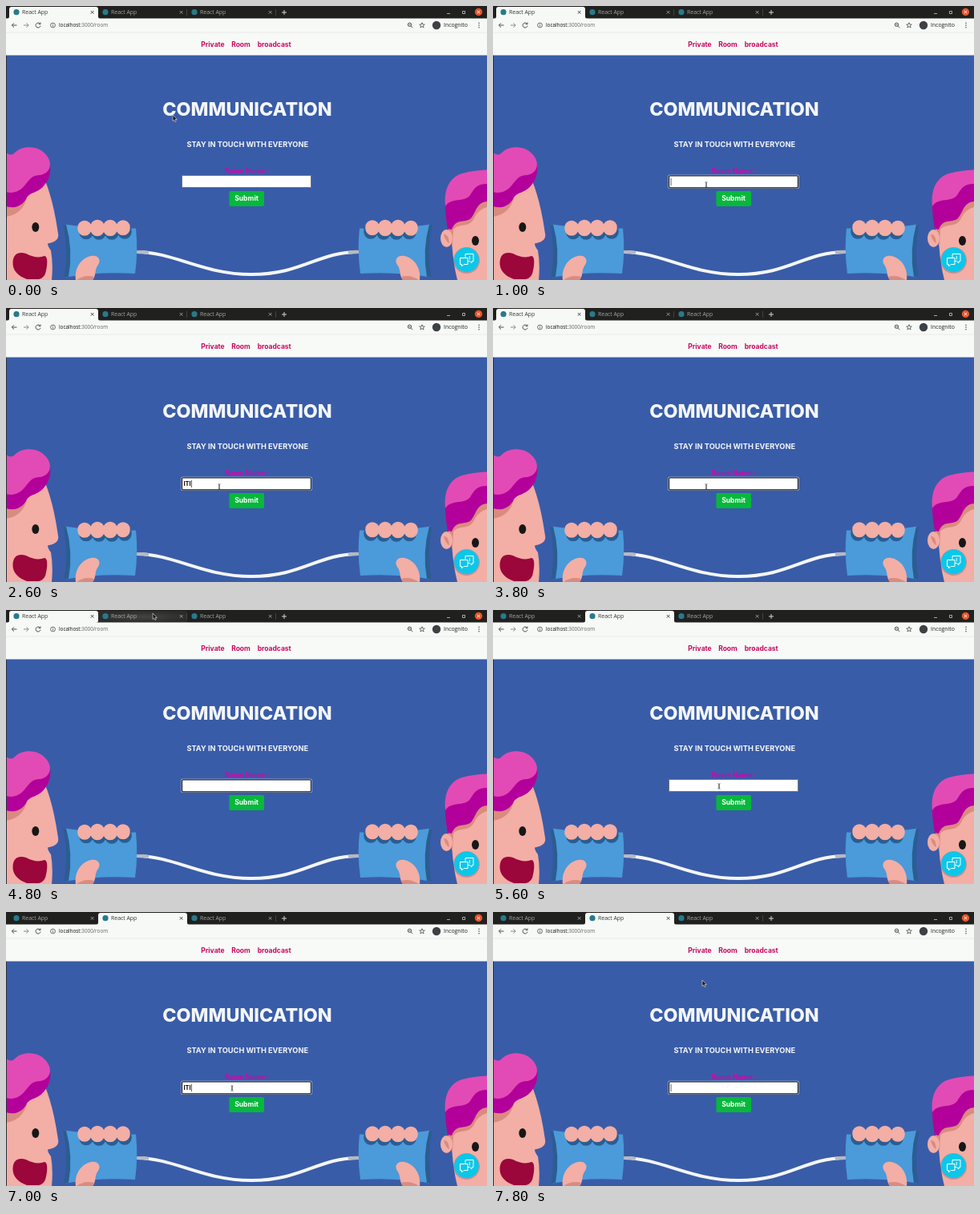
Write an HTML page that moves like this. It is 600 by 342 pixels and loops after 8 s.

```html
<!DOCTYPE html>
<html lang="en">
<head>
<meta charset="utf-8">
<title>Room chat</title>
<style>
  html, body { margin: 0; width: 100%; height: 100%; overflow: hidden; }
  svg { display: block; width: 100%; height: 100%; }
  text { font-family: Inter, sans-serif; font-weight: 700; }
  .ui { font-family: "Open Sans", sans-serif; font-weight: 400; font-size: 6.9px; }
  .mid { text-anchor: middle; }
  .line { fill: none; stroke: #4a4d50; stroke-width: 1; }
  .skin { fill: #f3aea5; }
  .shade { fill: #da8b80; }
  .pink { fill: #e24bb5; }
  .magenta { fill: #b3009a; }
</style>
</head>
<body>
<svg viewBox="0 0 600 342" preserveAspectRatio="none">
  <defs>
    <radialGradient id="glow"><stop stop-color="#444542"/><stop offset="1" stop-color="#2b2c2a"/></radialGradient>
    <path id="fingers" fill="none" stroke-width="17.500" stroke-linecap="round" d="M98 276.500V278M114 275.500V278.500M130 275.500V278.500M146 276V277.500"/>
    <g id="can">
      <path fill="#4b9ad9" d="M73 272.500Q118 279 162 277.500Q165 306 161 334Q118 331 75 338.500Q84 305 73 272.500Z"/>
      <path fill="#2b5d92" d="M71.500 273L75 272.500Q84 305 78 338L72.500 338.500Q78 305 71.500 273Z"/>
      <use href="#fingers" x="2" y="4.500" stroke="#2b5d92"/>
      <use href="#fingers" stroke="#f3aea5"/>
      <path class="skin" d="M87 342C85 326 95 314 106 312C115 310 119 317 115 323C110 329 113 336 108 342Z"/>
      <path class="shade" d="M88 342Q98 335 110 338L108 342Z"/>
    </g>
  </defs>

  <rect width="600" height="342" fill="#395ca8"/>

  <g id="left-face">
    <path class="skin" d="M0 232L48 216Q59 242 65 284Q67 294 52 296.500Q52 300 56 305Q59 322 57 342H0Z"/>
    <path class="shade" d="M0 246Q15 246 20 236L27 236Q22 260 0 263Z"/>
    <path class="magenta" d="M0 208L55 197Q57 212 49 222C40 235 29 231 25 241C19 251 9 253 0 250Z"/>
    <path class="pink" d="M0 183Q7 188 11 183C22 172 43 175 51 187C59 198 54 209 43 211C32 211 30 216 24 223C18 231 9 235 0 232Z"/>
    <ellipse cx="36.800" cy="276" rx="4.500" ry="6" fill="#171717"/>
    <path fill="#9b063b" d="M8.500 320C9 309 16 306 25 309Q38 316 48 312C52 312 52 322 50 330Q49 339 41 341H26C15 337 8 330 8.500 320Z"/>
  </g>

  <g id="right-face">
    <path class="skin" d="M554 262L600 240V342H563Q558 322 556.500 300L553 285Z"/>
    <path class="shade" d="M552 262L600 240V251Q589 254 584 265C577 278 566 270 558 279L557 300L552 280Z"/>
    <ellipse class="skin" cx="549.500" cy="290" rx="7.500" ry="11"/>
    <path class="shade" d="M546 285Q552 284 553 296Q548 294 546 285Z"/>
    <path class="magenta" d="M548 239L600 216V244C587 245 586 258 580 265C571 272 562 264 556 279L551 278Q547 258 548 239Z"/>
    <path class="pink" d="M548 250C546 229 553 214 569 209Q583 205 600 204.500V222C587 222 584 228 579 236C571 246 556 238 548 250Z"/>
    <ellipse cx="585.500" cy="293" rx="4.500" ry="6" fill="#171717"/>
  </g>

  <path fill="none" stroke="#f4f6f6" stroke-width="4" d="M163 307C210 307 245 335 306 335C370 335 388 307 440 307"/>
  <path fill="none" stroke="#b5b9c0" stroke-width="4" d="M162 307Q171 306.500 178 308M441 307Q434 306.500 427 308"/>
  <use href="#can"/>
  <use href="#can" transform="translate(603) scale(-1 1)"/>

  <circle cx="574.500" cy="317.500" r="16.500" fill="#1d3f80" opacity=".25"/>
  <circle cx="574.500" cy="316.800" r="15.300" fill="#0bc7e9"/>
  <g fill="#0bc7e9" stroke="#fff" stroke-width="1" stroke-linejoin="round">
    <path d="M573 309.500H583V318.500H581V321L578.500 318.500H573Z"/>
    <path d="M566.500 314.500H576V322.500H571L568.500 325V322.500H566.500Z"/>
    <path d="M578.300 312V316.500" stroke-width=".9"/>
  </g>

  <rect width="1" height="342" fill="#2d313c"/>
  <rect y="33" width="600" height="28.500" fill="#f8faf8"/>
  <g class="mid" fill="#c9085f" font-size="8.500">
    <text x="258" y="50.500">Private</text>
    <text x="293" y="50.500">Room</text>
    <text x="334.700" y="50.500">broadcast</text>
  </g>
  <g class="mid" fill="#f3f6f8">
    <text x="301" y="137" font-size="23.300" style="font-weight:800">COMMUNICATION</text>
    <text x="301.300" y="176" font-size="9.250">STAY IN TOUCH WITH EVERYONE</text>
  </g>
  <text class="mid" x="300.500" y="208.800" font-size="8.600" fill="#bd0fae">Room Name :</text>

  <g id="focus">
    <rect x="218.500" y="210.800" width="163" height="17" rx="1.500" fill="#e9edf3"/>
    <rect x="219.500" y="211.800" width="161" height="15" rx="1" fill="#fff" stroke="#17191c" stroke-width="1.200"/>
  </g>
  <rect id="plain" x="219.500" y="211.500" width="161" height="15" fill="#fff" stroke="#70757c"/>
  <text id="typed" x="221.500" y="222" font-size="7.500" fill="#111"></text>
  <rect id="caret" y="215" width=".7" height="9" fill="#222"/>
  <rect x="278.500" y="231" width="43.500" height="19" rx="1.800" fill="#06b83b"/>
  <text class="mid" x="300" y="243.300" font-size="8.600" fill="#fff">Submit</text>

  <rect width="600" height="16" fill="#20211f"/>
  <g id="tabs"></g>
  <path class="line" style="stroke:#d4d6d4" d="M344 8H350M347 5V11"/>
  <path class="line" style="stroke:#c9cbc9;stroke-width:.8" d="M550 9.500H554M569.500 6.500H572.500V9.500H569.500Z"/>
  <circle cx="589.500" cy="7.500" r="4.700" fill="#e8552b"/>
  <path class="line" style="stroke:#fff" d="M587.800 5.800L591.200 9.200M591.200 5.800L587.800 9.200"/>

  <rect y="15.500" width="600" height="17.500" fill="#f7f9f7"/>
  <rect y="32.700" width="600" height=".6" fill="#dcdfdc"/>
  <path class="line" d="M13.500 24H7.500M10 21.300L7.300 24L10 26.700M42.300 22A3 3 0 1 0 43 24.800M43 20.500V22.700H40.800"/>
  <path class="line" style="stroke:#85898a" d="M22 24H28M25.500 21.300L28.200 24L25.500 26.700"/>
  <circle class="line" cx="58.500" cy="24" r="2.900" style="stroke-width:.8"/>
  <path class="line" style="stroke-width:.8" d="M58.500 23.500V25.700M58.500 22.200V22.900"/>
  <text class="ui" x="66" y="26.300" style="font-size:6.350px" fill="#111">localhost<tspan fill="#5f6361">:3000/room</tspan></text>
  <circle class="line" cx="503.500" cy="23.300" r="2.200"/>
  <path class="line" d="M505.200 25L507.300 27.100M502.500 23.300H504.500"/>
  <path class="line" style="stroke-width:.8" d="M519 20.700L519.900 23L522.300 23.100L520.400 24.600L521.100 27L519 25.600L516.900 27L517.600 24.600L515.700 23.100L518.100 23Z"/>
  <circle cx="537" cy="24" r="5.200" fill="#3d4144"/>
  <text class="ui" x="546" y="26.300" fill="#1d1f21">Incognito</text>
  <g fill="#4a4d50">
    <circle cx="590" cy="21.300" r=".8"/><circle cx="590" cy="24" r=".8"/><circle cx="590" cy="26.700" r=".8"/>
  </g>

  <path id="arrow" d="M0 0V7.500L1.700 6L2.900 8.700L4.300 8L3.100 5.500H5.300Z" fill="#151515" stroke="#eee" stroke-width=".6"/>
  <path id="beam" d="M-1.500 -3.300Q0 -3.300 0 -2.300V2.300Q0 3.300 -1.500 3.300M1.500 -3.300Q0 -3.300 0 -2.300V2.300Q0 3.300 1.500 3.300" fill="none" stroke="#333" stroke-width=".7"/>
</svg>
<script>
const LOOP = 8000, STEP = 200;
const el = id => document.getElementById(id);
const show = (id, on) => el(id).setAttribute('visibility', on ? 'visible' : 'hidden');

// Pointer stops: time, x, y
const path = [
  [0, 208, 136], [200, 208, 136], [800, 266, 223], [3800, 266, 223],
  [4600, 183, 4], [5000, 183, 4], [5600, 282, 220], [7200, 282, 220], [7800, 261, 85]
];
// Typing sessions: focus start, end, key times, Enter time
const sessions = [
  { from: 1000, to: 5000, keys: [1800, 2200, 2400], enter: 3200 },
  { from: 5800, to: LOOP, keys: [6400, 6600, 6800], enter: 7400 }
];

function pointerAt(t) {
  const next = path.findIndex(p => p[0] > t);
  if (next < 0) return path[path.length - 1].slice(1);
  const [t0, x0, y0] = path[next - 1], [t1, x1, y1] = path[next];
  const u = (t - t0) / (t1 - t0), k = u * u * (3 - 2 * u);
  return [x0 + (x1 - x0) * k, y0 + (y1 - y0) * k];
}

function tab(i, active, hover) {
  const x = 4 + 111 * i, ink = active ? '#333638' : '#a4a6a3';
  const fill = active ? '#f7f9f7' : hover ? 'url(#glow)' : 'none';
  const divider = !active && i ? `<path d="M${x + 110.5} 4V12" stroke="#50524f" stroke-width=".7"/>` : '';
  return `<path d="M${x - 3} 16Q${x} 16 ${x} 13V4Q${x} 1 ${x + 3} 1H${x + 108}Q${x + 111} 1 ${x + 111} 4V13Q${x + 111} 16 ${x + 114} 16Z" fill="${fill}"/>
    <circle cx="${x + 9}" cy="7.700" r="3.600" fill="#287a8c"/>
    <text class="ui" x="${x + 16}" y="10.300" fill="${ink}">React App</text>
    <path d="M${x + 101.8} 6l3.600 3.600m0-3.600l-3.600 3.600" stroke="${ink}" stroke-width=".9"/>${divider}`;
}

let drawnTabs = '';
function draw(t) {
  const [x, y] = pointerAt(t);
  const active = t < 5000 ? 0 : 1;
  const hover = y < 16 ? Math.floor((x - 4) / 111) : -1;
  const tabs = [0, 1, 2].map(i => tab(i, i === active, i === hover)).join('');
  if (tabs !== drawnTabs) el('tabs').innerHTML = drawnTabs = tabs;

  const session = sessions.find(s => t >= s.from && t < s.to);
  const count = session && t < session.enter ? session.keys.filter(k => t >= k).length : 0;
  el('typed').textContent = 'ITI'.slice(0, count);
  show('focus', session);
  show('plain', !session);
  const lastKey = session && [session.from, ...session.keys, session.enter].filter(k => t >= k).pop();
  show('caret', session && (t - lastKey) % 1000 < 500);
  el('caret').setAttribute('x', 221.7 + [0, 2.2, 7.2, 9.3][count]);

  const overInput = x > 219 && x < 381 && y > 211 && y < 227;
  show('arrow', !overInput);
  show('beam', overInput);
  el(overInput ? 'beam' : 'arrow').setAttribute('transform', `translate(${x} ${y})`);
}

function frame() {
  draw(Math.floor(performance.now() % LOOP / STEP) * STEP);
  requestAnimationFrame(frame);
}
frame();
</script>
</body>
</html>
```
